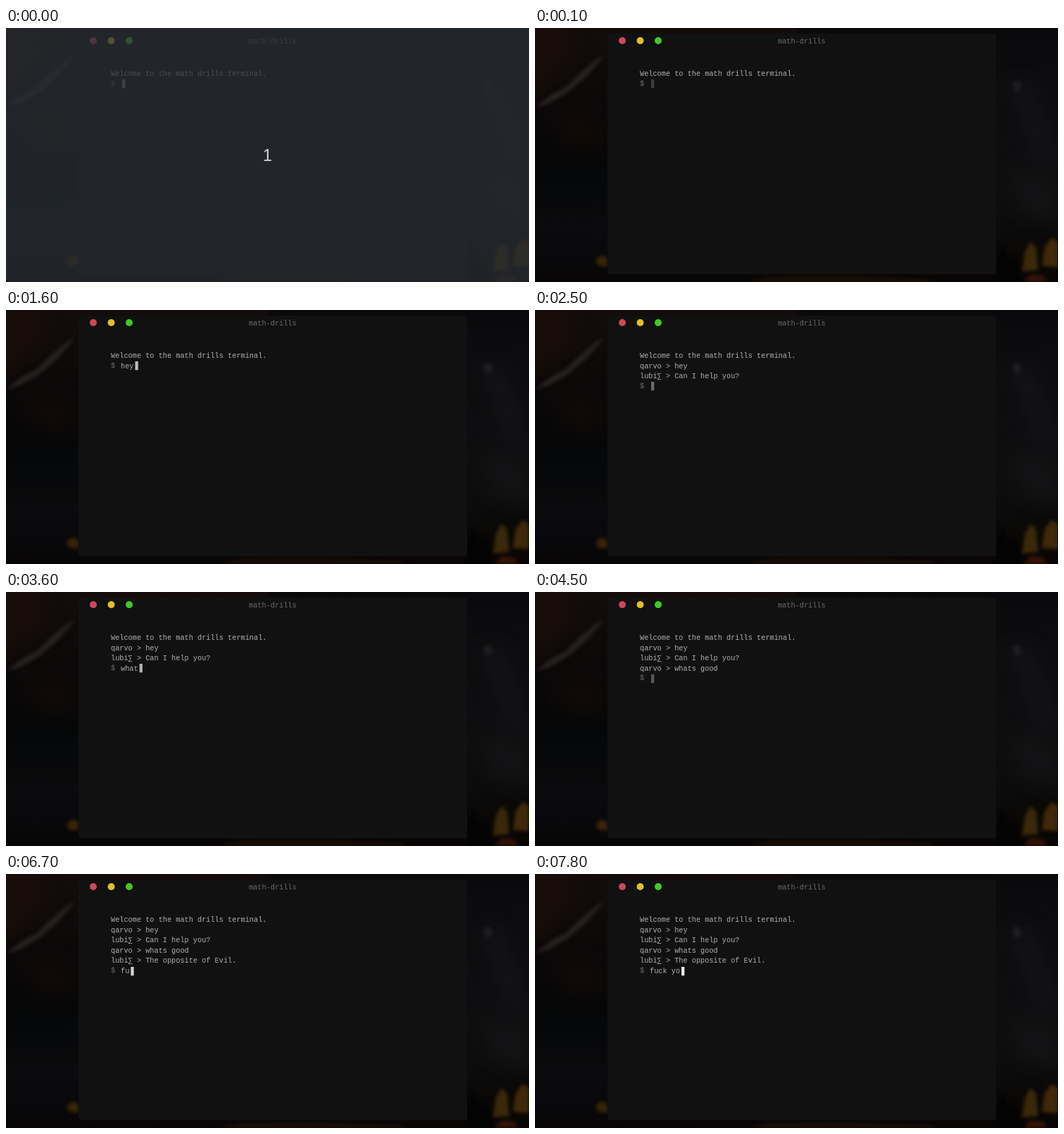
Recreate the animation shown at these times as an HTML page. Size 743 by 361 pixels, loop 8000 ms.

```html
<!DOCTYPE html>
<html lang="en">
<head>
<meta charset="utf-8">
<title>math-drills</title>
<style>
  html, body { margin: 0; width: 100%; height: 100%; overflow: hidden; background: #040507; }
  svg { display: block; width: 743px; height: 361px; }
  filter { color-interpolation-filters: sRGB; }
  text { font: 10.25px "Liberation Mono", "Courier New", monospace; white-space: pre; fill: #b0b0b0; }
  .dim { fill: #6c6c6c; }
  .count { font: 24px "Liberation Sans", Arial, sans-serif; fill: #d2d4d6; text-anchor: middle; }
  #cursor { fill: #f2f2f2; animation: blink 1010ms ease infinite paused; }
  @keyframes blink {
    0%, 100% { opacity: 1; }
    50% { opacity: 0; }
  }
</style>
</head>
<body>
<svg viewBox="0 0 743 361">
  <defs>
    <filter id="soft" x="-50%" y="-50%" width="200%" height="200%"><feGaussianBlur stdDeviation="12"/></filter>
    <filter id="fine" x="-50%" y="-50%" width="200%" height="200%"><feGaussianBlur stdDeviation="2.5"/></filter>
    <linearGradient id="left" x1="0" y1="0" x2="0" y2="1">
      <stop offset="0" stop-color="#130c0b"/>
      <stop offset=".25" stop-color="#0d0909"/>
      <stop offset=".45" stop-color="#080708"/>
      <stop offset=".6" stop-color="#050708"/>
      <stop offset=".78" stop-color="#0b0a0c"/>
      <stop offset=".92" stop-color="#08080a"/>
      <stop offset="1" stop-color="#080505"/>
    </linearGradient>
    <linearGradient id="right" x1="0" y1="0" x2="0" y2="1">
      <stop offset="0" stop-color="#09090b"/>
      <stop offset=".2" stop-color="#0d0c0e"/>
      <stop offset=".5" stop-color="#0e0d0f"/>
      <stop offset=".72" stop-color="#0d0d0e"/>
      <stop offset=".85" stop-color="#0a0908"/>
      <stop offset="1" stop-color="#090505"/>
    </linearGradient>
  </defs>

  <!-- night mountains -->
  <rect width="372" height="361" fill="url(#left)"/>
  <rect x="372" width="371" height="361" fill="url(#right)"/>
  <g filter="url(#soft)">
    <path d="M-20 -20H50L60 40L0 95H-20Z" fill="#180d0a"/>
    <path d="M30 120L90 130L100 170L40 165Z" fill="#100a07"/>
    <path d="M672 75L705 80L735 150L743 200L710 190L690 130Z" fill="#141215"/>
    <path d="M670 200L743 215V280L690 260Z" fill="#131214"/>
  </g>
  <g filter="url(#fine)">
    <path d="M0 113L24 94L44 84L62 66L88 44L98 40L72 70L46 92L20 107Z" fill="#272222"/>
    <path d="M678 78L688 75L691 86L682 92Z" fill="#201e20"/>
    <path d="M655 361V332L664 308L674 332L684 322L692 361Z" fill="#040304"/>
    <path d="M86 330L94 323L103 327V339L90 338Z" fill="#3a2408"/>
    <path d="M692 346L696 318L704 304L712 312L715 344Z" fill="#3a280a"/>
    <path d="M720 338L724 312L734 298L743 304V340Z" fill="#40290a"/>
    <path d="M694 361L704 350L722 352L728 361Z" fill="#351507"/>
    <path d="M300 361L330 354L440 353L560 357L570 361Z" fill="#1a0f07"/>
  </g>

  <!-- terminal window -->
  <rect x="103" y="8" width="552" height="342" rx="4" fill="#111"/>
  <circle cx="124" cy="18" r="5" fill="#cf475e"/>
  <circle cx="149.5" cy="18" r="5" fill="#e6bd2b"/>
  <circle cx="175" cy="18" r="5" fill="#40ca24"/>
  <text x="345" y="22" class="dim">math-drills</text>
  <g id="log"></g>
  <text id="prompt" x="149" class="dim">$</text>
  <text id="input" x="163"></text>
  <rect id="cursor" width="4.3" height="12.4"/>

  <g id="cover">
    <rect width="743" height="361" fill="#292e33" opacity=".77"/>
    <text x="371.5" y="189" class="count">1</text>
  </g>
</svg>
<script>
  const LOOP = 8000, STEP = 100, CHAR = 6.15, TOP = 68, ROW = 14.55;
  const ME = 'qarvo > ', BOT = 'lubi∑ > ';
  const $ = id => document.getElementById(id);

  // keys: when each character of the message is typed
  const turns = [
    { say: 'hey', keys: [1200, 1300, 1500], enter: 1900, reply: 'Can I help you?', at: 2300 },
    { say: 'whats good', keys: [3200, 3400, 3500, 3600, 3700, 3900, 4000, 4200, 4300, 4400],
      enter: 4500, reply: 'The opposite of Evil.', at: 4900 },
    { say: 'fuck yo', keys: [6500, 6700, 6900, 7100, 7300, 7500, 7700], enter: Infinity }
  ];

  const baseline = row => TOP + row * ROW;

  const lines = [{ text: 'Welcome to the math drills terminal.', at: 0 }];
  for (const { say, enter, reply, at } of turns) {
    if (reply) lines.push({ text: ME + say, at: enter }, { text: BOT + reply, at });
  }
  lines.forEach((line, row) => {
    line.node = document.createElementNS('http://www.w3.org/2000/svg', 'text');
    line.node.setAttribute('x', 149);
    line.node.setAttribute('y', baseline(row));
    line.node.textContent = line.text;
    $('log').append(line.node);
  });

  function draw(t) {
    let row = 0;
    for (const line of lines) {
      const shown = t >= line.at;
      line.node.style.display = shown ? '' : 'none';
      if (shown) row++;
    }
    const turn = turns.find(({ enter }) => t < enter);
    const typed = turn.keys.filter(k => t >= k).length;
    const y = baseline(row);

    $('prompt').setAttribute('y', y - 1);
    $('input').setAttribute('y', y + 0.5);
    $('input').textContent = turn.say.slice(0, typed);
    $('cursor').setAttribute('x', 165 + typed * CHAR);
    $('cursor').setAttribute('y', Math.round(y - 9.2));
    $('cursor').style.animationDelay = `${-(t + 150)}ms`;
    $('cover').style.display = t < STEP ? '' : 'none';
  }

  const start = performance.now();
  function tick() {
    const t = (performance.now() - start) % LOOP;
    draw(Math.floor(t / STEP) * STEP);
    requestAnimationFrame(tick);
  }
  tick();
</script>
</body>
</html>
```
